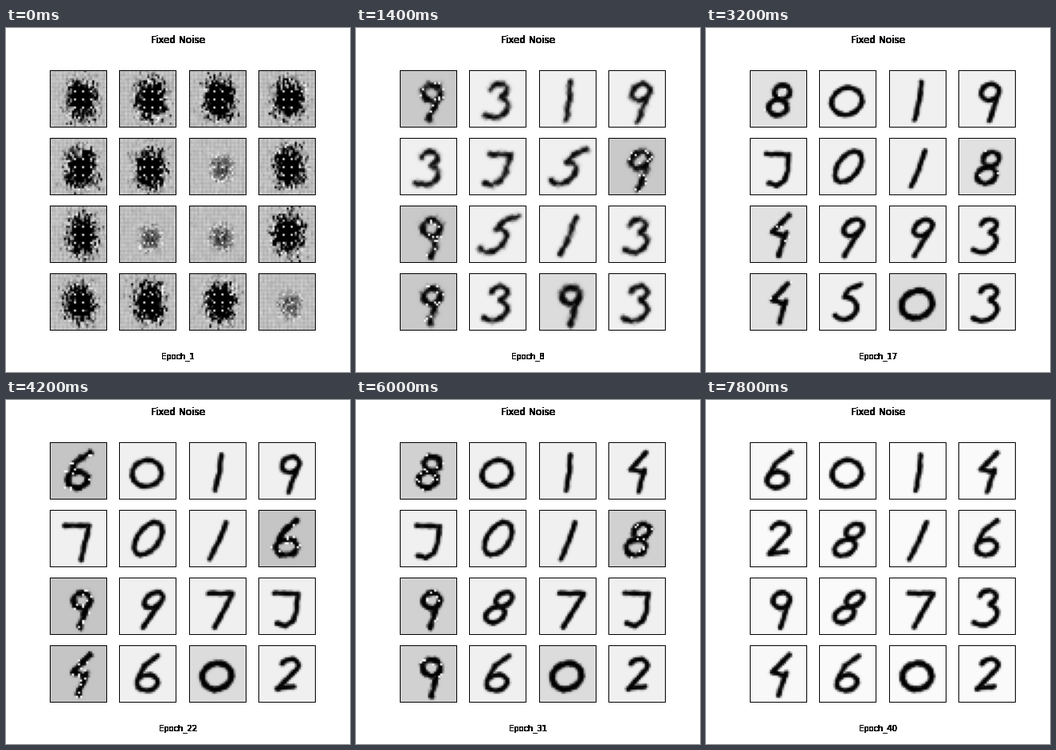
Recreate the animation shown at these times as a matplotlib script. Size 432 by 432 pixels, loop 8000 ms.

```python
import numpy as np
import matplotlib.pyplot as plt
from matplotlib.animation import FuncAnimation

STAGE, CELL, GRID = 432, 71, 28
EPOCHS, STEP = 40, 200
SCALE = GRID/CELL

plt.rcParams["font.family"] = "DejaVu Sans"
gy, gx = np.mgrid[0:GRID, 0:GRID].astype(float)
pixels = np.stack([gx.ravel(), gy.ravel()], 1)


# ---------- digits, in pixels around the cell's middle ----------
def line(*flat):
    return np.array(flat, float).reshape(-1, 2)


def arc(cx, cy, rx, ry, start=0, end=360):
    a = np.radians(np.linspace(start, end, 16))
    return np.stack([cx + rx*np.cos(a), cy + ry*np.sin(a)], 1)


DIGITS = {
    "0": [arc(-1, -2, 15, 20)],
    "O": [arc(-2, 1, 19, 17)],
    "1": [line(0, -22, 1, 0, -1, 23)],
    "2": [arc(0, -12, 11, 9, 200, 400), line(8, -6, -11, 17, 10, 14)],
    "3": [arc(-1, -13, 10, 8, 190, 430), arc(-5, 8, 17, 13, -65, 130)],
    "4": [line(8, -25, -9, -4, 8, 0), line(8, -3, 3, 24)],
    "5": [line(13, -24, -1, -18, -6, -8), arc(-4, 6, 15, 14, -95, 140)],
    "6": [line(10, -25, -6, -12, -13, 5), arc(-1, 9, 13, 10)],
    "7": [line(-19, -18, 11, -18, 4, 24)],
    "8": [arc(3, -11, 10, 9), arc(-1, 9, 12, 10)],
    "9": [arc(2, -10, 11, 10), line(13, -10, 9, 4, 4, 25)],
    "J": [line(-18, -18, 10, -17, 11, 4, 8, 16, -1, 22, -11, 19)],
}

# what the sixteen cells show around each epoch
STAGES = {5: "9319 3J59 9513 9393", 12: "8394 3018 9573 93O7",
          17: "8O19 J018 4993 45O3", 22: "6O19 7016 997J 46O2",
          31: "8O14 J018 987J 96O2", 40: "6O14 2816 9873 46O2"}
STAGES = {epoch: row.replace(" ", "") for epoch, row in STAGES.items()}
GREY_CELLS, FAINT_BLOBS = {0, 7, 8, 12}, {6, 9, 10, 15}
GREY_LEVELS = [.82, .74, .88, .77, .82, .97]


def distance(strokes):
    """Distance from every pixel to the nearest stroke."""
    a = np.concatenate([s[:-1] for s in strokes])
    b = np.concatenate([np.diff(s, axis=0) for s in strokes])
    rel = pixels[:, None] - a
    t = np.clip((rel*b).sum(2)/((b*b).sum(1) + 1e-9), 0, 1)
    gap = rel - t[..., None]*b
    return np.sqrt((gap**2).sum(2).min(1)).reshape(GRID, GRID)


def place(points, slant, size):
    x, y = points.T*size
    return np.stack([37 + x - slant*y, 38 + y], 1)*SCALE - .5


def background(i, epoch):
    if i in GREY_CELLS:
        return np.interp(epoch, list(STAGES), GREY_LEVELS)
    start = .86 if i == 14 else .94
    return np.interp(epoch, [31, 40], [start, .98])


def digit(i, epoch):
    row, col = divmod(i, 4)
    stage = min(STAGES, key=lambda e: abs(e - epoch))
    young = np.clip((14 - epoch)/9, 0, 1)
    slant = .4 if row in (1, 2) and col in (1, 2) else .12
    slant += .05*np.sin(epoch + 2*i)
    size = 1 + .03*np.sin(.7*epoch + i)
    d = distance([place(s, slant, size) for s in DIGITS[STAGES[stage][i]]])

    # slow waves roughen the edge of the brush
    p = np.random.default_rng(i).uniform(0, 6, 4) + .4*epoch
    wave = np.sin(.8*gx + p[0])*np.sin(.7*gy + p[1]) + .5*np.sin(1.7*gx + p[2])*np.sin(1.5*gy + p[3])
    messy = np.clip((.9 - background(i, epoch))/.1, 0, 1)*(i in GREY_CELLS)
    radius = 1.25 + .2*messy + .3*(i == 14)
    d = d + wave*(.22 + .4*young + .3*messy)
    ink = 1/(1 + np.exp((d - radius)/(.22 + .25*young)))

    rng = np.random.default_rng(100*epoch + i)
    img = background(i, epoch)*(1 - ink)
    speck = (d < 2.2) & (rng.random(d.shape) < .07*messy)
    return np.where(speck, 1, img)


def blob(i):
    rng = np.random.default_rng(100 + i)
    faint = i in FAINT_BLOBS
    rx, ry = (13, 15) if faint else (18, 24)
    cx, cy = rng.uniform(37, 41), 37 + 3*faint + rng.uniform(-2, 2)
    u, v = (gx + .5)/SCALE, (gy + .5)/SCALE
    d = (np.abs((u - cx)/rx)**2.6 + np.abs((v - cy)/ry)**2.6)**(1/2.6)
    noise = rng.normal(0, 1, d.shape)
    noise = (noise + .7*np.roll(noise, 1, 0))/1.2
    core = 1/(1 + np.exp((d - .88 + .22*noise)/.11))
    rim = np.exp(-((d - 1)/.3)**2)
    img = .74 + .04*(gx % 2 + gy % 2 - 1) + .02*noise
    img += .14*rim*rng.normal(0, 1, d.shape)
    img -= core*(.45 + .2*noise if faint else 1.1)
    dots = (gx % 4 == 0) & (gy % 4 == 2) & (d < .75)
    return np.clip(np.where(dots, .95, img), 0, 1)


def picture(i, epoch):
    w = min((epoch - 1)/4, 1)
    return w*digit(i, epoch) + (1 - w)*blob(i)


# ---------- stage ----------
fig = plt.figure(figsize=(6, 6), dpi=72, facecolor="white")
tiles = []
for i in range(16):
    row, col = divmod(i, 4)
    left, top = 55 + round(col*87.33), 53 + 85*row
    ax = fig.add_axes([left/STAGE, 1 - (top + CELL)/STAGE, CELL/STAGE, CELL/STAGE])
    ax.set_xticks([])
    ax.set_yticks([])
    for spine in ax.spines.values():
        spine.set(linewidth=1, color="black")
    tiles.append(ax.imshow(np.ones((GRID, GRID)), cmap="gray", vmin=0, vmax=1,
                           interpolation="hanning", aspect="auto"))

# text is stacked to give it its heavy edge
labels = []
for _ in range(20):
    fig.text(.5, .98, "Fixed Noise", size=12, ha="center", va="top")
    labels.append(fig.text(.5, 17/STAGE, "", size=10, ha="center", va="baseline"))


def draw(frame):
    epoch = frame + 1
    for i, tile in enumerate(tiles):
        tile.set_data(picture(i, epoch))
    for label in labels:
        label.set_text(f"Epoch_{epoch}")
    return tiles + labels


anim = FuncAnimation(fig, draw, frames=EPOCHS, interval=STEP, repeat=True,
                     repeat_delay=0, blit=False)
plt.show()
```
